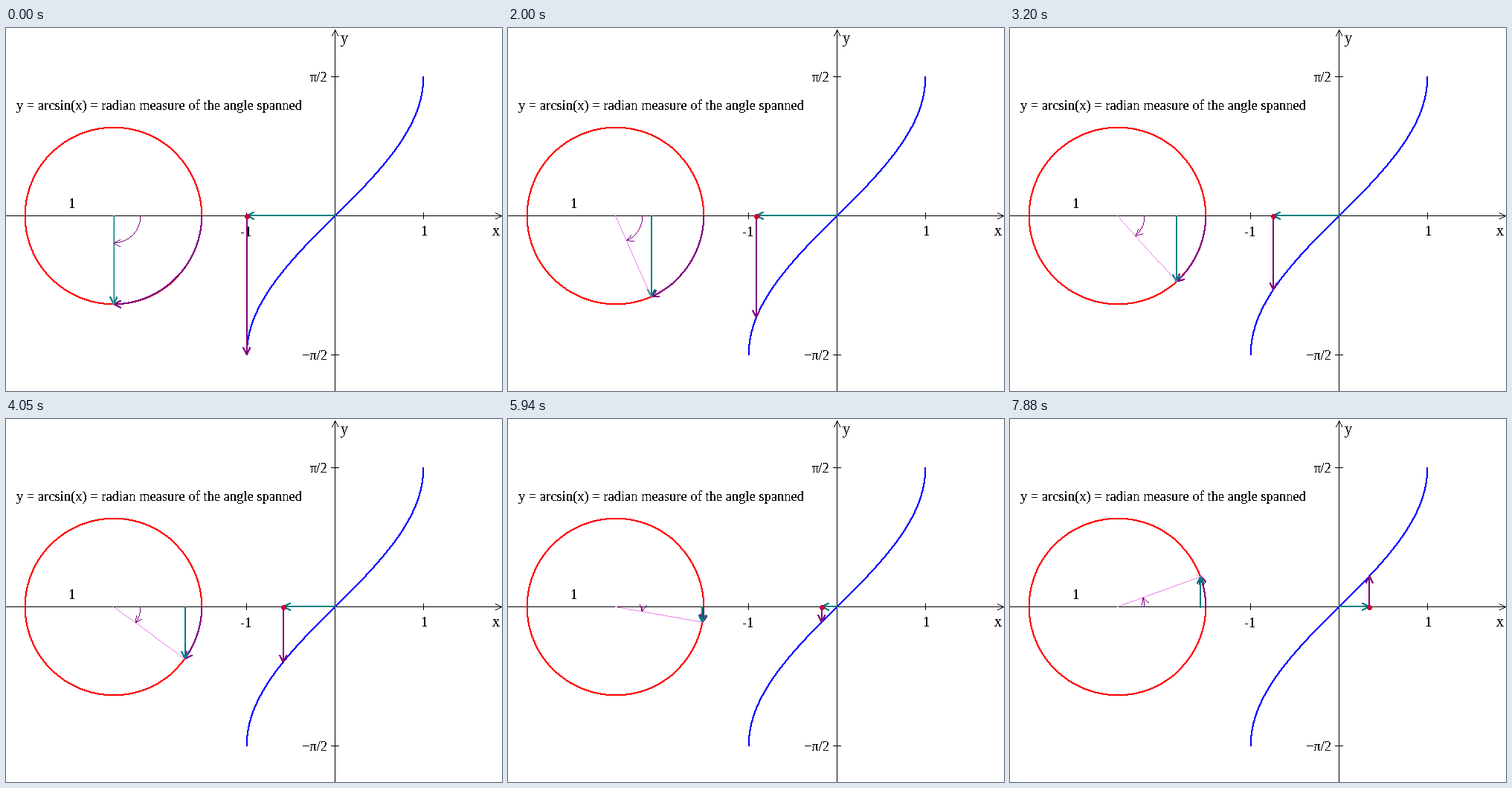
These frames come from a looping animation (667 by 488 pixels, 8 s). A matplotlib script:

```python
import numpy as np
import matplotlib
import matplotlib.pyplot as plt
from matplotlib.animation import FuncAnimation

matplotlib.rcParams["text.antialiased"] = False
matplotlib.rcParams["path.simplify"] = False

W, H, DPI = 667, 488, 100
PX = 72 / DPI                      # one pixel in points
CX, CY, R = 144.5, 252.5, 118.8    # unit circle
OX = 442.5                         # origin of the graph
STEP_MS = 20
LOOP_MS = 8000
PURPLE, TEAL, PINK = "#800080", "#008080", "#ee82ee"

# Angles below the axis in degrees: steps of two, with a few exceptions.
angles = np.array([90, 89, *range(88, 44, -2), 45, *range(42, 14, -2), 15,
                   *range(14, 0, -2), *range(-2, -21, -2)])

# Time at which each pose begins, linear between the knots.
knot_pose = [1, 8, 9, 16, 17, 18, 24, 25, 28, 29, 32, 33, 34, 35,
             40, 41, 42, 43, 48, 49, 56]
knot_ms = [400, 1310, 1460, 2390, 2540, 2660, 3470, 3620, 4050, 4200, 4590,
           4710, 4830, 4980, 5670, 5820, 5940, 6060, 6760, 6910, 7880]
starts = np.interp(np.arange(1, len(angles)), knot_pose, knot_ms)

fig = plt.figure(figsize=(W / DPI, H / DPI), dpi=DPI, facecolor="white")
ax = fig.add_axes([0, 0, 1, 1])
ax.set_xlim(0, W)
ax.set_ylim(H, 0)
ax.axis("off")


def to_grid(v, size):
    return np.floor(v + (size - 1) / 2) + (size % 2) / 2


def brush(path, size):
    """Trace a path with square dabs that fill whole pixels."""
    x, y = (np.asarray(v, float) for v in path)
    reach = np.maximum(np.abs(np.diff(x)), np.abs(np.diff(y)))
    way = np.append(0, np.cumsum(reach))
    t = np.linspace(0, way[-1], int(np.ceil(way[-1])) + 1)
    x = to_grid(np.interp(t, way, x), size)
    y = to_grid(np.interp(t, way, y), size)
    half = size / 2 - 0.05
    gap = np.full_like(x, np.nan)
    return (np.column_stack([x - half, x + half, gap]).ravel(),
            np.column_stack([y, y, gap]).ravel())


class Pen:
    """An aliased line, one or two pixels wide."""

    def __init__(self, color, size, z):
        self.size = size
        self.art = ax.plot([], [], color=color, lw=(size - 0.1) * PX,
                           antialiased=False, snap=False, zorder=z,
                           solid_capstyle="butt")[0]

    def draw(self, *paths):
        parts = [brush(p, self.size) for p in paths]
        self.art.set_data(*np.concatenate(parts, axis=1))


def head(tip, direction, back=9, half=4.5):
    """Open arrowhead as a path of three points."""
    (tx, ty), (dx, dy) = tip, direction
    bx, by = tx - back * dx, ty - back * dy
    return ([bx - half * dy, tx, bx + half * dy],
            [by + half * dx, ty, by - half * dx])


def arc(radius, a):
    t = np.linspace(0, a, 60)
    x, y = CX + radius * np.cos(t), CY + radius * np.sin(t)
    s = np.sign(a)
    return (x, y), head((x[-1], y[-1]), (-s * np.sin(a), s * np.cos(a)))


def label(x, baseline, text, size=18.53, ha="left"):
    ax.text(x, baseline, text, size=size * PX, ha=ha, va="baseline",
            family=["Liberation Serif", "DejaVu Serif"], zorder=1)


# Axes and ticks
Pen("black", 1, 2).draw(
    ([0, W - 0.5], [CY, CY]), ([OX, OX], [2.5, H]),
    head((W - 0.5, CY), (1, 0), 8, 4), head((OX, 2.5), (0, -1), 8, 4),
    *[([x, x], [248.5, 256.5]) for x in (OX - R, OX + R)],
    *[([437.5, 447.5], [y, y]) for y in (65.5, 439.5)])

# Labels
label(14, 110, "y = arcsin(x) = radian measure of the angle spanned")
label(84, 242, "1")
label(558, 279, "1")
label(315, 280, "-1")
label(432, 72, "π/2", ha="right")
label(432, 446, "−π/2", ha="right")
label(450, 20, "y", size=20)
label(653.5, 279, "x", size=20)

# Circle and graph
turn = np.linspace(0, 2 * np.pi, 361)
Pen("red", 2, 3).draw((CX + R * np.cos(turn), CY + R * np.sin(turn)))
half_turn = np.linspace(-np.pi / 2, np.pi / 2, 181)
Pen("blue", 2, 3).draw((OX + R * np.sin(half_turn), CY - R * half_turn))

# Moving parts
big_arc = Pen(PURPLE, 2, 4)
sine = Pen(TEAL, 2, 5)
radius = Pen(PINK, 1, 6)
small_arc = Pen(PURPLE, 1, 7)
across = Pen(TEAL, 2, 4)
drop = Pen(PURPLE, 2, 5)
dot = ax.plot([], [], "o", ms=6 * PX, mfc="#dc0032", mec="#b00040",
              mew=PX, antialiased=False, zorder=7)[0]


def update(frame):
    now = frame * STEP_MS + STEP_MS / 2
    a = np.radians(angles[np.searchsorted(starts, now, side="right")])
    s = np.sign(a)
    px, py = CX + R * np.cos(a), CY + R * np.sin(a)
    gx, gy = OX - R * np.sin(a), CY + R * a
    row = CY - 0.5

    big_arc.draw(*arc(R, a))
    small_arc.draw(*arc(36.5, a))
    sine.draw(([px, px], [CY, py]), head((px, py), (0, s)))
    radius.draw(([CX, px], [CY, py]))
    across.draw(([OX, gx], [row, row]), head((gx, row), (-s, 0)))
    drop.draw(([gx, gx], [CY, gy]), head((gx, gy), (0, s)))
    dot.set_data([gx], [CY])


anim = FuncAnimation(fig, update, frames=LOOP_MS // STEP_MS,
                     interval=STEP_MS, repeat=True, repeat_delay=0)
plt.show()
```
